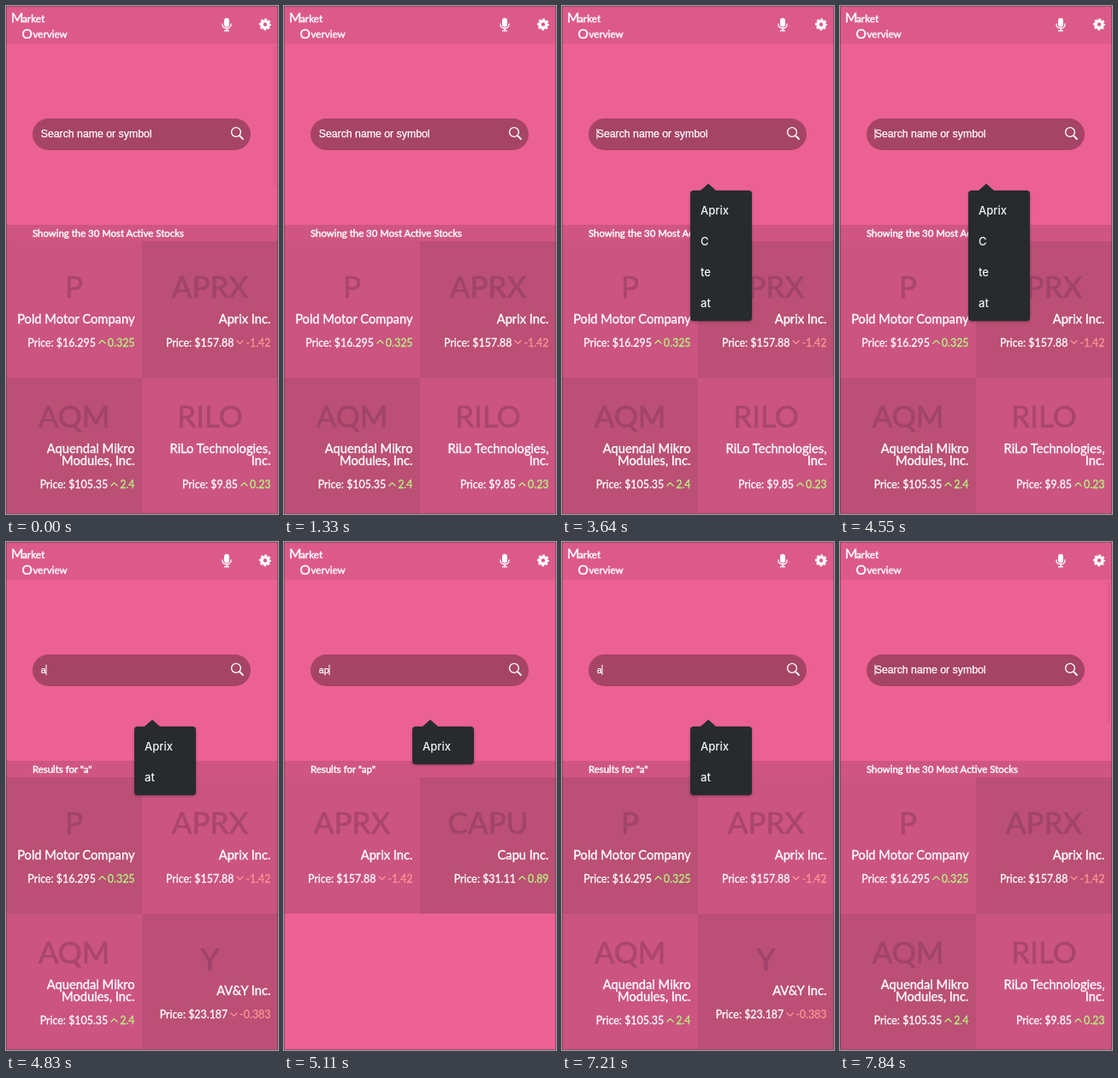
Write an HTML page that moves like this. It is 318x592 px and loops after 8000 ms.

```html
<!DOCTYPE html>
<html lang="en">
<head>
<meta charset="utf-8">
<title>Market Overview</title>
<style>
html, body { margin: 0; width: 100%; height: 100%; overflow: hidden; background: #ec6193; }
#app { position: relative; width: 318px; height: 592px; overflow: hidden; font-family: Lato, sans-serif; color: #fff; }
#app > svg, #bar, #stripe, #cards, #scroll, #menu, #edge { position: absolute; }
#app > svg { left: 0; top: 0; }
#bar { left: 0; top: 0; width: 318px; height: 44px; background: #dc5a89; }
#edge { inset: 0; border: 1px solid rgba(90, 40, 60, .5); }
#stripe { left: 0; top: 255px; width: 318px; height: 19px; background: #d05682; }
#cards { left: 0; top: 274px; width: 318px; display: flex; flex-wrap: wrap; }
.card { width: 159px; height: 158.5px; box-sizing: border-box; display: flex; flex-direction: column; justify-content: center; background: #cb5480; }
.dark { background: #bb4f75; }
.ticker { position: relative; top: -2px; font-size: 35px; line-height: 42px; text-align: center; color: #a9466b; -webkit-text-stroke: .6px; }
.dark .ticker { color: #a0446a; }
.name { margin: 7.5px 8.5px 13.5px 0; font-size: 14.7px; line-height: 14.5px; text-align: right; white-space: pre; -webkit-text-stroke: .35px; }
.price { margin-right: 8.5px; font-size: 12.4px; line-height: 15px; text-align: right; white-space: nowrap; -webkit-text-stroke: .3px; }
.price svg { margin: 0 2px 3px 3px; fill: none; stroke: currentColor; stroke-width: 1.2; vertical-align: middle; }
.up { color: #b4f57e; }
.down { color: #ff9292; }
#scroll { left: 311.5px; top: 46px; width: 4px; height: 165px; border-radius: 2px; background: #e25d8c; }
#menu { left: 150px; top: 215px; width: 72px; padding: 5px 0 3px; box-sizing: border-box; border-radius: 4px; background: #272b2e; color: #f4f4f4; font: 500 13px/36px Inter, sans-serif; box-shadow: 0 1px 3px rgba(0, 0, 0, .35); }
#menu::before { content: ""; position: absolute; left: 12px; top: -8px; border: solid transparent; border-width: 0 9.5px 8px; border-bottom-color: #272b2e; }
#menu div { padding-left: 12px; }
.label { fill: #fff; stroke: #fff; stroke-width: .45; }
#query { stroke: #fff; stroke-width: .25; }
</style>
</head>
<body>
<div id="app">
  <div id="bar"></div>
  <div id="stripe"></div>
  <div id="cards"></div>
  <svg width="318" height="592" fill="#fff">
    <g class="label">
      <text x="6" y="19" font-size="15.5">M</text>
      <text x="19" y="19" font-size="11.8">arket</text>
      <text x="18.5" y="37.5" font-size="15.5">O</text>
      <text x="31.5" y="37" font-size="11.6">verview</text>
      <text id="status" x="31" y="268.8" font-size="11.4"></text>
    </g>
    <rect x="255" y="14" width="6" height="10.5" rx="3"/>
    <path d="M253 20.5v1a5 4.5 0 0 0 10 0v-1M258 26v3M255 28.7h6" fill="none" stroke="#fff" stroke-width="1.4"/>
    <g fill="none" stroke="#fff">
      <circle cx="303" cy="21.5" r="3.9" stroke-width="3.4"/>
      <circle cx="303" cy="21.5" r="5.9" stroke-width="2.2" stroke-dasharray="2.6 2.034" stroke-dashoffset="1.3"/>
    </g>
    <rect x="31" y="131" width="255" height="37" rx="18.5" fill="#a64466"/>
    <path d="M273 151L277.5 155.5" stroke="#fff" stroke-width="1.8"/>
    <circle cx="269" cy="147" r="5.4" fill="none" stroke="#fff" stroke-width="1.4"/>
    <text id="query" x="40.7" y="153" font-family="'Liberation Sans', Arial, sans-serif"></text>
    <rect id="caret" y="143" width="1" height="12"/>
  </svg>
  <div id="scroll"></div>
  <div id="menu"></div>
  <div id="edge"></div>
</div>
<script>
const $ = id => document.getElementById(id);
const LOOP = 8000;
const typing = [[0, ''], [4830, 'a'], [5110, 'ap'], [7210, 'a'], [7770, '']];
const hints = ['Aprix', 'C', 'te', 'at'];
const stocks = [
  ['P', 'Pold Motor Company', '16.295', '0.325'],
  ['APRX', 'Aprix Inc.', '157.88', '-1.42'],
  ['AQM', 'Aquendal Mikro\nModules, Inc.', '105.35', '2.4'],
  ['RILO', 'RiLo Technologies,\nInc.', '9.85', '0.23'],
  ['Y', 'AV&amp;Y Inc.', '23.187', '-0.383'],
  ['CAPU', 'Capu Inc.', '31.11', '0.89']
];

function card([ticker, name, price, change], dark) {
  const down = change[0] === '-';
  const chevron = down ? 'M.5 .5L4.5 4.5L8.5 .5' : 'M.5 4.5L4.5 .5L8.5 4.5';
  return `<div class="card ${dark ? 'dark' : ''}">
    <div class="ticker">${ticker}</div><div class="name">${name}</div>
    <div class="price">Price: $${price}<span class="${down ? 'down' : 'up'}"><svg width="9" height="5"><path d="${chevron}"/></svg>${change}</span></div>
  </div>`;
}

function show(q) {
  const found = stocks.filter(s => s[1].toLowerCase().includes(q)).slice(0, 4);
  // the checkerboard flips with each typed letter
  $('cards').innerHTML = found.map((s, i) => card(s, (i + (i >> 1) + q.length) % 2)).join('');
  $('menu').innerHTML = hints.filter(h => h.toLowerCase().startsWith(q)).map(h => `<div>${h}</div>`).join('');
  $('status').textContent = q ? `Results for "${q}"` : 'Showing the 30 Most Active Stocks';
  $('query').textContent = q || 'Search name or symbol';
  $('query').setAttribute('font-size', q ? 10.8 : 12.3);
  $('caret').setAttribute('x', 40.5 + q.length * 6);
}

let shown = null;
function frame(now) {
  const t = now % LOOP;
  const q = typing.filter(k => k[0] <= t).pop()[1];
  if (q !== shown) show(shown = q);
  $('caret').style.display = t >= 2940 ? '' : 'none';
  $('menu').style.display = t >= 3010 && t < 7770 ? '' : 'none';
  const fade = 1 - Math.max(0, Math.floor((t - 210) / 70)) / 4;
  $('scroll').style.opacity = t >= 7770 ? 1 : Math.max(0, fade);
  requestAnimationFrame(frame);
}
frame(performance.now());
</script>
</body>
</html>
```
